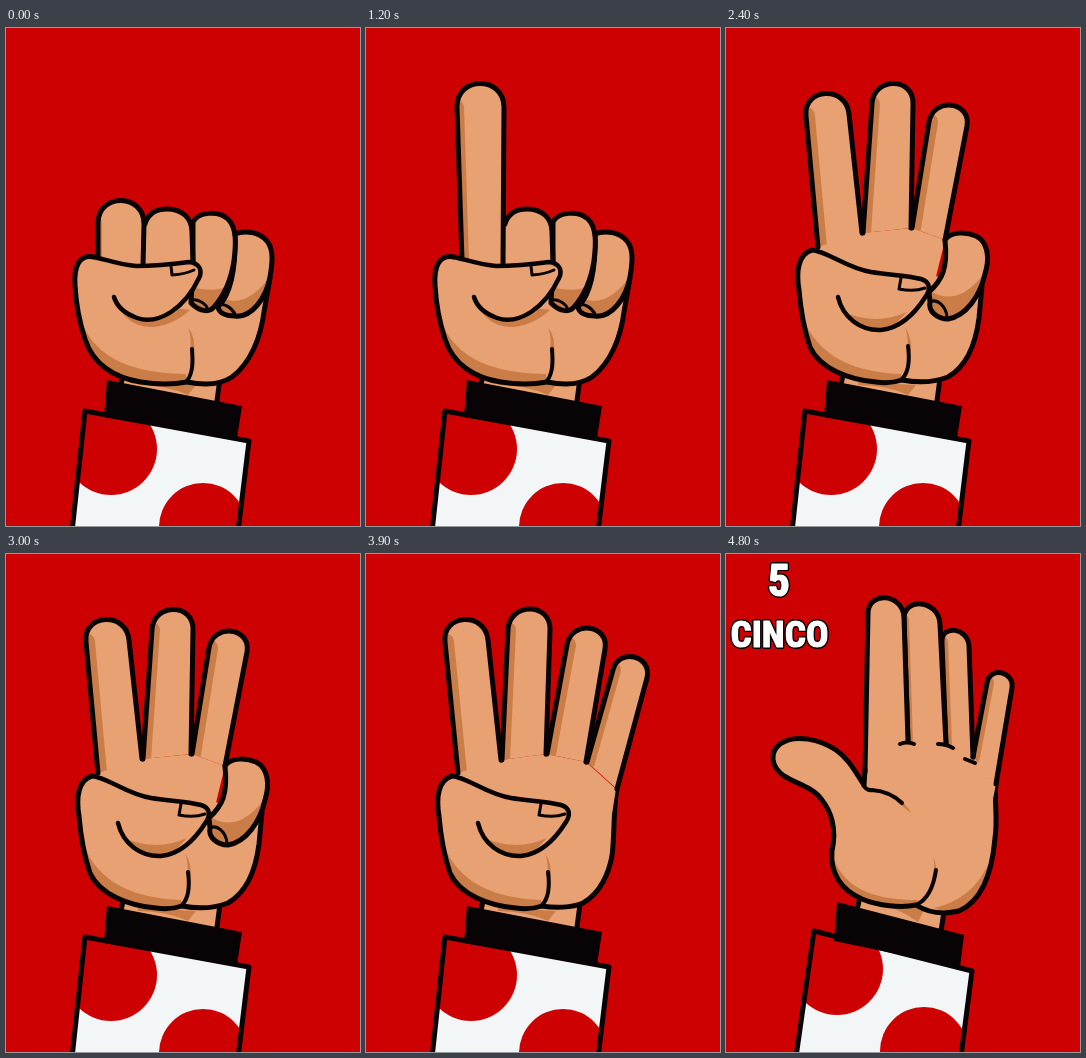
Animation of 354 by 498 pixels, one loop 5.1 s. Source, as an HTML page with a canvas:

```html
<!DOCTYPE html>
<html lang="es">
<head>
<meta charset="utf-8">
<title>Cinco</title>
<style>
html, body { margin: 0; width: 100%; height: 100%; overflow: hidden; background: #cd0002; }
canvas { display: block; width: 354px; height: 498px; }
</style>
</head>
<body>
<canvas id="stage" width="354" height="498"></canvas>
<script>
const ctx = document.getElementById('stage').getContext('2d');
const RED = '#cd0002', SKIN = '#e8a172', SHADE = '#cb7d48', INK = '#080405', CLOTH = '#f3f6f7';
const FACE = '"Roboto Condensed", "Open Sans Condensed", "Open Sans", Roboto, sans-serif';
const LOOP = 5100;
ctx.lineCap = ctx.lineJoin = 'round';

function fill(d, color) {
  ctx.fillStyle = color;
  ctx.fill(new Path2D(d));
}

function line(d, width = 4, color = INK) {
  ctx.strokeStyle = color;
  ctx.lineWidth = width;
  ctx.stroke(new Path2D(d));
}

function dot(x, y, r) {
  ctx.fillStyle = RED;
  ctx.beginPath();
  ctx.arc(x, y, r, 0, Math.PI * 2);
  ctx.fill();
}

function clipped(d, paint) {
  ctx.save();
  ctx.clip(new Path2D(d));
  paint();
  ctx.restore();
}

// Skin shape with an optional shadow kept inside it
function part(d, shadow, width = 5) {
  fill(d, SKIN);
  if (shadow) clipped(d, () => fill(shadow, SHADE));
  line(d, width);
}

// Left base, left top, right top, right base; the cap is a half circle
function finger(ax, ay, bx, by, cx, cy, dx, dy, band = 0) {
  const ux = (bx + cx - ax - dx) / 2, uy = (by + cy - Math.max(ay, dy) * 2) / 2;
  const k = Math.hypot(cx - bx, cy - by) * 2 / 3 / Math.hypot(ux, uy);
  const ox = ux * k, oy = uy * k;
  const cap = `${bx} ${by}C${bx + ox} ${by + oy} ${cx + ox} ${cy + oy} ${cx} ${cy}`;
  const d = `M${ax} ${ay}L${cap}L${dx} ${dy}`;
  fill(d, SKIN);
  if (band) clipped(d, () => line(`M${ax} ${ay}L${cap}`.split('C')[0], band * 2, SHADE));
  line(d, 5);
}

function sleeve(edge, cuff, dots) {
  fill(edge, CLOTH);
  clipped(edge, () => dots.forEach(p => dot(...p)));
  line(edge, 5);
  fill(cuff, INK);
}

function wrist(d, shadow, sides) {
  fill(d, SKIN);
  fill(shadow, SHADE);
  line(sides, 5);
}

function straightArm() {
  wrist('M116 340L214 346L210 380L114 362Z',
    'M132 354L190 357L182 367Q160 357 132 357Z',
    'M117 347L115 357M214 350L211 373');
  sleeve('M66 504L79 383L243 413L232 504', 'M101 352L236 378L231 411L98 389Z',
    [[105, 421, 46], [197, 499, 44]]);
}

function tiltedArm() {
  wrist('M135 335L219 350L214 385L132 362Z',
    'M145 346L200 352L192 368Q170 352 145 350Z',
    'M134 342L132 352M218 358L215 377');
  sleeve('M69 510L88 377L246 417L234 510', 'M111 348L238 381L234 413L108 387Z',
    [[111, 415, 46], [198, 497, 44]]);
}

// Palm, folded little and ring fingers
function closedPalm() {
  part('M88 229C72 226 68 240 69 257C70 276 74 296 79 311C87 336 108 350 135 354C154 357 170 356 181 354C196 357 214 357 226 349C245 335 255 308 258 284L264 250',
    'M72 285C84 322 112 345 180 346L180 360L100 360L70 320Z');
  fill('M182 299Q190 310 188 325L184 325Q186 310 182 299Z', SHADE);
  line('M181 353C187 345 187 334 186 321');
  part('M229 206C236 203 250 203 258 210C268 218 267 232 264 249C260 271 245 290 229 288C220 288 213 285 212 279C223 268 230 245 229 206Z',
    'M216 270Q240 282 266 246L264 295L210 290Z');
  line('M212 277C218 275 225 279 229 286', 3);
  part('M187 194C192 184 212 182 222 191C231 200 230 216 228 233C225 252 218 268 208 279C204 284 195 285 185 275L187 240Z',
    'M185 259Q205 264 218 260L208 290L180 285Z');
  line('M185 272C192 271 200 275 202 282', 3);
}

function closedThumb() {
  fill('M111 272C120 306 158 306 184 282Z', SHADE);
  const d = 'M88 229C101 232 115 237 130 238C150 238 168 236 183 234C193 235 197 242 193 250C187 263 177 276 165 284C154 291 142 294 131 290C120 286 111 279 108 269';
  fill(d, SKIN);
  line(d, 4.5);
  line('M165 238L166 247Q180 246 188 242', 3);
}

const foldedMiddle = () =>
  part('M139 196C142 186 150 181 161 181C176 181 186 190 186 204L187 237L139 239');

function fist() {
  straightArm();
  closedPalm();
  foldedMiddle();
  finger(92, 231, 92, 195, 138, 196, 137, 238, 4);
  closedThumb();
}

function one() {
  straightArm();
  closedPalm();
  foldedMiddle();
  finger(96, 232, 91, 79, 138, 79, 137, 238, 7);
  closedThumb();
}

function two() {
  straightArm();
  closedPalm();
  fill('M97 236L97 200L140 216L186 200L187 237Z', SKIN);
  finger(97, 232, 95, 87, 137, 88, 140, 217);
  finger(141, 217, 157, 74, 198, 78, 186, 192, 9);
  line('M186 192L187 236');
  closedThumb();
}

function openThumb(shaded) {
  fill('M113 274C126 311 160 310 190 284Z', shaded ? SHADE : SKIN);
  const d = 'M86 222C103 224 120 240 145 244C163 247 180 247 195 251C205 254 204 262 200 268C190 284 175 300 155 302C135 303 117 290 112 269';
  fill(d, SKIN);
  clipped(d, () => fill('M118 284Q150 298 181 284L160 306L128 304Z', SHADE));
  line(d, 4.5);
  line('M175 250L173 261Q188 264 199 260', 3);
}

function openPalm(right) {
  part('M86 222C72 226 70 244 73 262C75 286 79 304 84 319C94 341 124 352 150 354C162 356 170 354 176 352' + right,
    'M75 285C88 322 118 344 175 346L175 360L95 360L72 320Z');
  fill('M179 299Q186 310 185 323L181 323Q183 310 179 299Z', SHADE);
  line('M176 351C183 344 184 333 182 318');
}

function three() {
  straightArm();
  openPalm('C192 355 209 354 222 349C241 338 250 314 253 290L256 258');
  fill('M92 235L92 200L136 205L186 200L219 212L206 265Z', SKIN);
  finger(92, 219, 80, 88, 123, 86, 136, 205, 9);
  finger(137, 205, 146, 76, 187, 76, 185, 200, 8);
  finger(186, 200, 203, 94, 241, 98, 219, 212, 9);
  part('M219 212C225 203 241 204 250 208C262 214 264 230 259 246C254 268 240 288 222 291C211 291 202 283 204 274L203 264C216 252 222 241 219 212Z',
    'M206 264Q235 280 262 240L252 295L200 295Z');
  line('M204 274C211 270 220 278 221 289', 3);
  openThumb(true);
}

function four() {
  straightArm();
  openPalm('C188 354 206 354 217 349C235 339 243 318 246 302C249 278 247 256 251 235');
  fill('M92 235L92 200L135 206L180 200L220 208L250 235L246 260Z', SKIN);
  finger(92, 219, 79, 88, 122, 86, 135, 206, 9);
  finger(136, 206, 142, 76, 184, 76, 180, 200, 8);
  finger(181, 200, 201, 91, 239, 95, 220, 208, 9);
  finger(221, 208, 247, 116, 281, 124, 251, 235, 8);
  openThumb(false);
}

function caption(text, x, y, size) {
  ctx.font = `900 ${size}px ${FACE}`;
  ctx.strokeStyle = INK;
  ctx.lineWidth = 4;
  ctx.strokeText(text, x, y);
  ctx.strokeStyle = ctx.fillStyle = '#fff';
  ctx.lineWidth = 1.2;
  ctx.strokeText(text, x, y);
  ctx.fillText(text, x, y);
}

function captions() {
  ctx.textAlign = 'center';
  if ('fontStretch' in ctx) ctx.fontStretch = 'extra-condensed';
  ctx.font = `900 44px ${FACE}`;
  const size = Math.min(44, 44 * 98 / ctx.measureText('CINCO').width);
  caption('5', 53, 42, 44);
  caption('CINCO', 53.5, 93, size);
}

function five() {
  tiltedArm();
  part('M270 229C268 248 272 265 269 284C266 320 256 347 233 357C216 361 201 358 190 351C176 354 152 352 136 345C115 336 104 319 106 297C111 275 105 257 96 246C87 233 71 230 58 222C44 212 44 198 54 190C69 179 95 186 110 196C123 205 130 219 138 231',
    'M108 305C120 338 155 346 192 346L185 360L115 350ZM272 285C260 325 242 346 208 354L230 364L262 345Z');
  fill('M138 240L140 190L182 180L247 200L270 230L266 250Z', SKIN);
  finger(247, 203, 261, 129, 286, 134, 270, 230, 7);
  finger(220, 190, 216, 88, 243, 92, 247, 203, 6);
  finger(182, 187, 178, 66, 214, 70, 220, 190, 5);
  finger(139, 218, 142, 60, 178, 64, 182, 187);
  line('M139 216L138 231', 5);
  line('M174 190Q181 187 188 190M212 190Q220 190 227 194M239 205L249 209');
  fill('M168 242Q181 250 185 259Q176 252 166 244Z', SHADE);
  line('M137 230Q140 237 146 236C158 237 169 242 176 249');
  fill('M207 302Q212 312 209 325L206 323Q210 312 207 302Z', SHADE);
  line('M190 351C203 345 208 330 210 316');
  captions();
}

const poses = [[4200, five], [3300, four], [2400, three], [1500, two], [600, one], [0, fist]];
let shown;

function frame(now) {
  const t = now % LOOP;
  const draw = poses.find(p => t >= p[0])[1];
  if (draw !== shown) {
    shown = draw;
    ctx.fillStyle = RED;
    ctx.fillRect(0, 0, 354, 498);
    draw();
  }
  requestAnimationFrame(frame);
}
frame(0);
</script>
</body>
</html>
```
